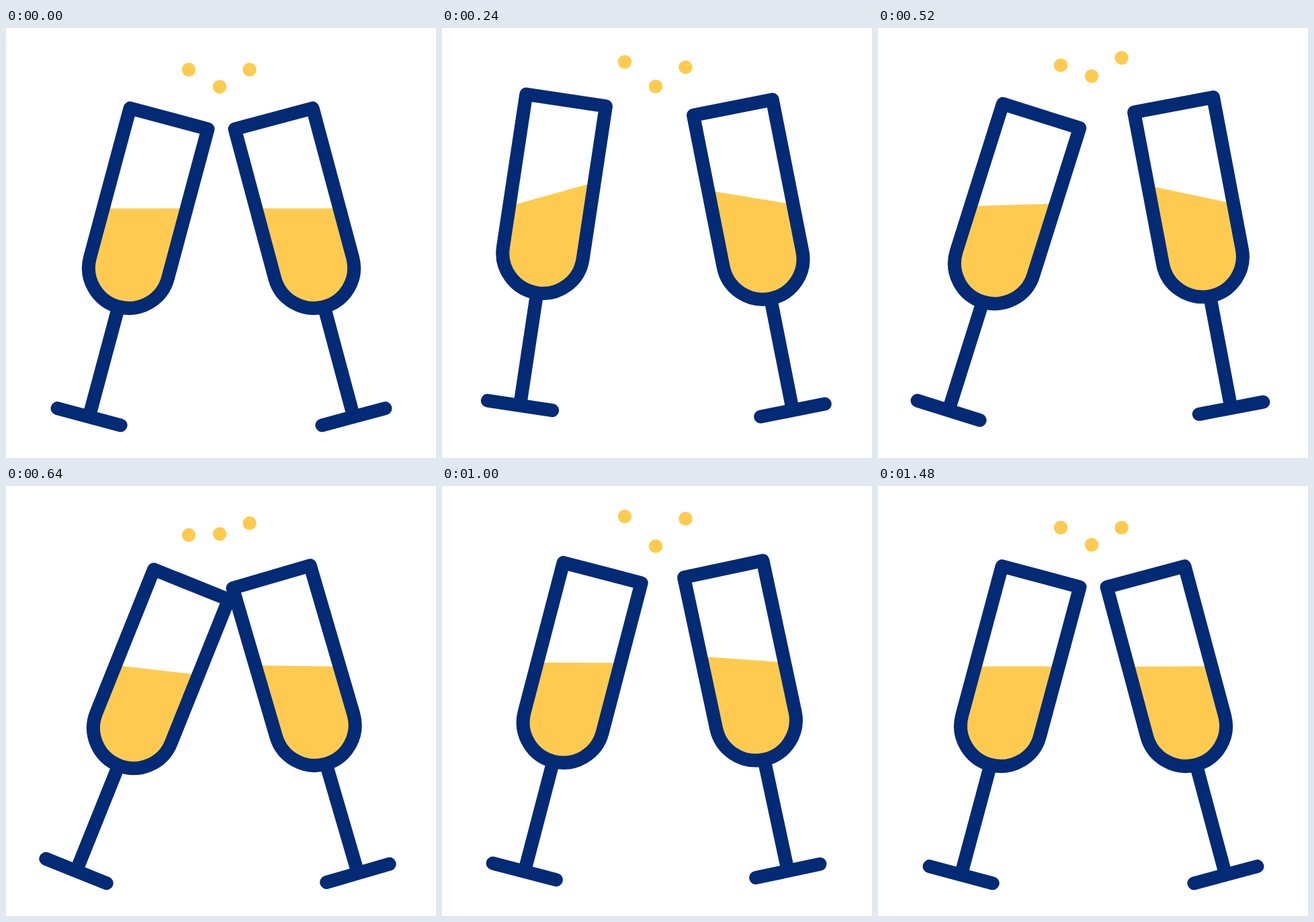
These frames come from a looping animation (640 px wide and 640 px high, 2.04 s). An HTML page:

```html
<!DOCTYPE html>
<html lang="en">
<head>
<meta charset="utf-8">
<title>Cheers</title>
<style>
  html, body { margin: 0; height: 100%; overflow: hidden; background: #fff; }
  svg { display: block; width: 100vw; height: 100vh; }
  .flute { fill: none; stroke: #032a75; stroke-width: 20; stroke-linecap: round; stroke-linejoin: round; }
  .drink, circle { fill: #fecb50; }
</style>
</head>
<body>
<svg viewBox="0 0 640 640">
  <defs>
    <path id="flute" class="flute" d="M-60 0V-230H60V0A60 60 0 0 1 -60 0ZM0 60V229M-48.7 229.5H48.7"/>
  </defs>
  <g id="left"><path class="drink"/><use href="#flute"/></g>
  <g transform="matrix(-1 0 0 1 641 0)">
    <g id="right"><path class="drink"/><use href="#flute"/></g>
  </g>
  <circle cx="272" r="10.2"/>
  <circle cx="318" r="10.2"/>
  <circle cx="362.5" r="10.2"/>
</svg>
<script>
const LOOP = 2040, STEP = 40;
const REST = [0, 0, 0, 0];
const SWING_OUT = [-50, -33.7, -9.8, -24];

// Poses are offsets from rest: x, y, tilt, slosh. The right glass is mirrored.
const glasses = [
  { id: 'left', side: 1, delay: 0, reach: 1,
    clink: [8.4, 4.8, 7.7, 8], recoil: [-6, -13.5, -1, -7.5], settle: 5.2 },
  { id: 'right', side: -1, delay: 40, reach: 0.78,
    clink: [-1.5, -1, 1.3, -0.8], recoil: [-14.5, -14, -4.8, -12.4], settle: 9.2 }
];
const swingBeats = [0, 400, 590, 840, 1120, 1480];
for (const g of glasses) {
  g.element = document.getElementById(g.id);
  g.poses = [REST, SWING_OUT.map(v => v * g.reach), g.clink, g.recoil, [0, 0, 0, g.settle], REST];
}

const bounceBeats = [0, 400, 700, 940, 1280];
const bounce = [0, -17.5, 14, -18, 0];
const dots = [{ y: 62, delay: 0 }, { y: 87.5, delay: 200 }, { y: 62, delay: 120 }];
document.querySelectorAll('circle').forEach((circle, i) => dots[i].element = circle);

// Current segment of a list of beats and the sine-eased progress through it.
function locate(beats, t) {
  t = Math.min(Math.max(t, 0), beats[beats.length - 1]);
  const to = Math.max(1, beats.findIndex(beat => beat >= t));
  const part = (t - beats[to - 1]) / (beats[to] - beats[to - 1]);
  return { to, p: (1 - Math.cos(Math.PI * part)) / 2 };
}
const mix = (a, b, p) => a + (b - a) * p;

function drawGlass({ element, poses, delay, side }, t) {
  const { to, p } = locate(swingBeats, t - delay);
  const [dx, dy, lean, slosh] = REST.map((_, i) => mix(poses[to - 1][i], poses[to][i], p));
  const tilt = 15 + lean;
  const fill = 91.6 + side * slosh / 5;
  const rise = 60 * Math.tan((slosh - tilt) * Math.PI / 180);
  element.setAttribute('transform', `translate(${183 + dx} ${357 + dy}) rotate(${tilt})`);
  element.firstChild.setAttribute('d',
    `M-60 ${-fill - rise}L60 ${-fill + rise}V0A60 60 0 0 1 -60 0Z`);
}

function drawDot({ element, y, delay }, t) {
  const { to, p } = locate(bounceBeats, t - delay);
  element.setAttribute('cy', y + mix(bounce[to - 1], bounce[to], p));
}

const start = performance.now();
function tick() {
  const t = Math.floor((performance.now() - start) % LOOP / STEP) * STEP;
  glasses.forEach(glass => drawGlass(glass, t));
  dots.forEach(dot => drawDot(dot, t));
  requestAnimationFrame(tick);
}
tick();
</script>
</body>
</html>
```
